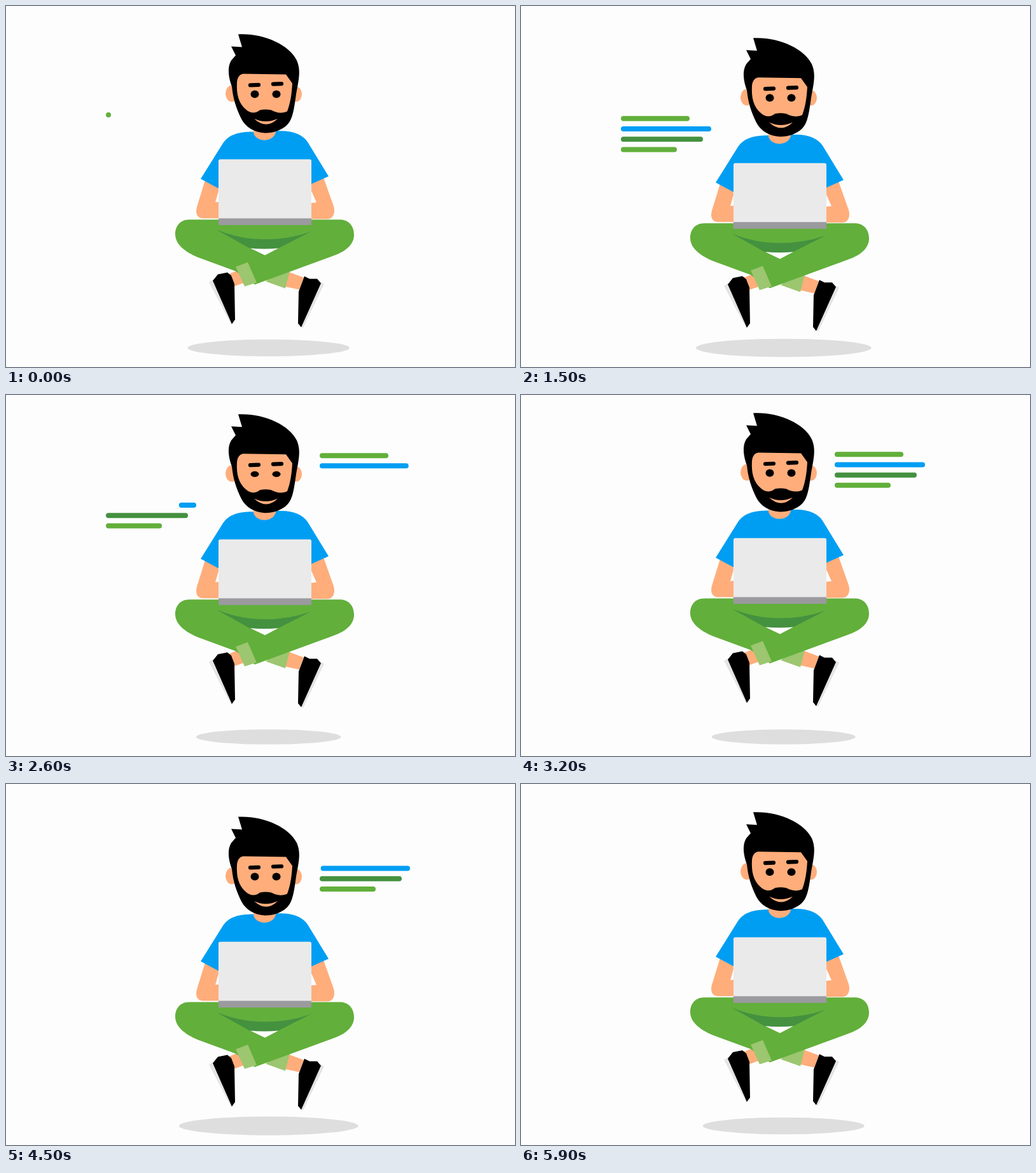
These frames come from a looping animation (800x567 px, 6000 ms). An HTML page:

```html
<!DOCTYPE html>
<html lang="en">
<head>
<meta charset="utf-8">
<title>Floating coder</title>
<style>
  html, body { margin: 0; width: 100%; height: 100%; overflow: hidden; background: #fdfdfd; }
  svg { display: block; width: 100%; height: 100%; }
</style>
</head>
<body>
<svg viewBox="0 0 800 567">
  <ellipse id="shadow" cx="412.7" cy="537" fill="#dedede"/>
  <g id="body">
    <g id="lines" stroke-width="8" stroke-linecap="round"></g>

    <!-- feet -->
    <g fill="#ffad7b">
      <path d="M349 421L366 414L375 434L358 440Z"/>
      <path d="M444 417L468 426L461 445L438 440Z"/>
    </g>
    <path fill="#e4e4e4" d="M319 433L326 429L358 495L354 500Z"/>
    <path d="M325 431L333 421L348 418L354 423L359 436L360 492L355 499Z"/>
    <path fill="#e4e4e4" d="M493 432L500 436L467 505L462 503Z"/>
    <path d="M469 424L477 428L489 428L495 435L464 504L459 498L460 448Z"/>
    <path fill="#9cc66f" d="M408 432L424 420L446 416L439 443Z"/>

    <!-- legs -->
    <path fill="#62af3b" d="M288 335H526C540 336 547 346 547 359C547 375 532 386 514 392L391 437L361 416L301 394C280 385 266 373 266 358C266 346 273 335 288 335Z"/>
    <path fill="#449140" d="M331 351Q368 366 407 366Q446 366 479 354L428 380Q405 384 383 380Z"/>
    <path fill="#fdfdfd" d="M384 380Q406 382 428 380L407 391Z"/>
    <path fill="#9cc66f" d="M361 409L380 402L394 434L375 440Z"/>

    <!-- arms and shirt -->
    <g fill="#ffad7b">
      <path d="M313 273L333 283L334 290L329 308L335 307V333H310C301 333 297 326 300 315Z"/>
      <path d="M499 269L515 314C518 325 514 334 505 334H479V309L488 308L480 290V277Z"/>
    </g>
    <path fill="#009ef3" d="M389 197C364 197 350 202 341 215L306 271L334 286V335H480V279L507 267L474 213C466 201 450 194 424 196Z"/>
    <path fill="#ffad7b" d="M389 185H424V198C420 214 393 214 389 199Z"/>

    <!-- laptop -->
    <path fill="#eaeaea" d="M334 334V243Q334 240.300 337 240.300H477Q480 240.300 480 243V334Z"/>
    <rect x="334" y="333" width="146" height="10.500" fill="#9b9a9f"/>

    <!-- head -->
    <g fill="#ffad7b">
      <ellipse cx="355" cy="137" rx="10" ry="13"/>
      <ellipse cx="456" cy="138" rx="9" ry="12"/>
    </g>
    <path d="M365 44C404 42 445 60 457 85C464 101 460 116 456 138C453 159 451 177 442 186C433 195 420 199 407 199C390 198 377 190 370 177C362 161 357 146 355 126C350 113 347 96 354 85L361 77L354 63L371 64Z"/>
    <path fill="#ffad7b" d="M373 106L440 107L450 121C449 138 447 152 442 165C432 169 425 167 417 163Q408 161 399 163C392 169 384 168 377 162C365 152 362 137 363 119C364 111 367 107 373 106Z"/>
    <path fill="#ffad7b" d="M390 176.500Q408 185 427 176.500Q409 194 390 176.500Z"/>
    <g stroke="#000" stroke-width="6.200" stroke-linecap="round">
      <path d="M384 123.800L397 123.300M420 122.200L433 121.700"/>
    </g>
    <ellipse class="eye" cx="391" cy="138" rx="6.500"/>
    <ellipse class="eye" cx="425" cy="138" rx="6.500"/>
  </g>
</svg>
<script>
  const LOOP = 6000, STEP = 100, HALF = 2000, LOWEST = 945;
  const LINE_GAP = 260, LINE_TIME = 260;
  const BLINKS = [700, 2750, 4800];
  const ROWS = [[100, '#62af3b'], [134, '#009ef3'], [121, '#449140'], [80, '#62af3b']];
  const BLOCKS = [
    { x: 161, y: 170.5, draw: 0, erase: 2142 },
    { x: 497, y: 108.8, draw: 2100, erase: 4223 }
  ];

  const $ = id => document.getElementById(id);
  const eyes = document.querySelectorAll('.eye');
  const clamp = v => Math.max(0, Math.min(1, v));
  const smooth = v => v * v * (3 - 2 * v);
  // quick start, soft landing
  const glide = u => u * (1.3 + u * (0.4 - 0.7 * u));

  function set(el, attrs) {
    for (const k in attrs) el.setAttribute(k, attrs[k]);
  }

  const strokes = BLOCKS.flatMap(block => ROWS.map(([len, color], i) => {
    const el = document.createElementNS('http://www.w3.org/2000/svg', 'line');
    const y = block.y + i * 16.2;
    set(el, { stroke: color, y1: y, y2: y });
    $('lines').appendChild(el);
    return {
      el, len, x: block.x,
      draw: block.draw + i * LINE_GAP,
      erase: block.erase + i * LINE_GAP
    };
  }));

  function render(t) {
    // 0 at the lowest point, 1 at the highest
    const phase = (t - LOWEST + 2 * HALF) % (2 * HALF) / HALF;
    const rise = phase > 1 ? 2 - phase : phase;

    const top = 23.4 + 30.7 * glide(1 - rise);
    set($('body'), { transform: `translate(0 ${top - 44.2})` });

    const rx = 153.5 - 41.5 * glide(rise);
    set($('shadow'), { rx, ry: rx * 0.104 });

    const open = Math.min(...BLINKS.map(b => Math.abs(t - b) / 200), 1);
    eyes.forEach(e => set(e, { ry: Math.max(0.8, 6 * open) }));

    for (const s of strokes) {
      const from = smooth(clamp((t - s.erase) / LINE_TIME));
      const to = smooth(clamp((t - s.draw) / LINE_TIME));
      const shown = t >= s.draw && from < 1;
      set(s.el, {
        x1: s.x + s.len * from,
        x2: s.x + s.len * to + 0.01,
        visibility: shown ? 'visible' : 'hidden'
      });
    }
  }

  const start = performance.now();
  function tick() {
    const t = (performance.now() - start) % LOOP;
    render(Math.floor(t / STEP) * STEP);
    requestAnimationFrame(tick);
  }
  render(0);
  requestAnimationFrame(tick);
</script>
</body>
</html>
```
